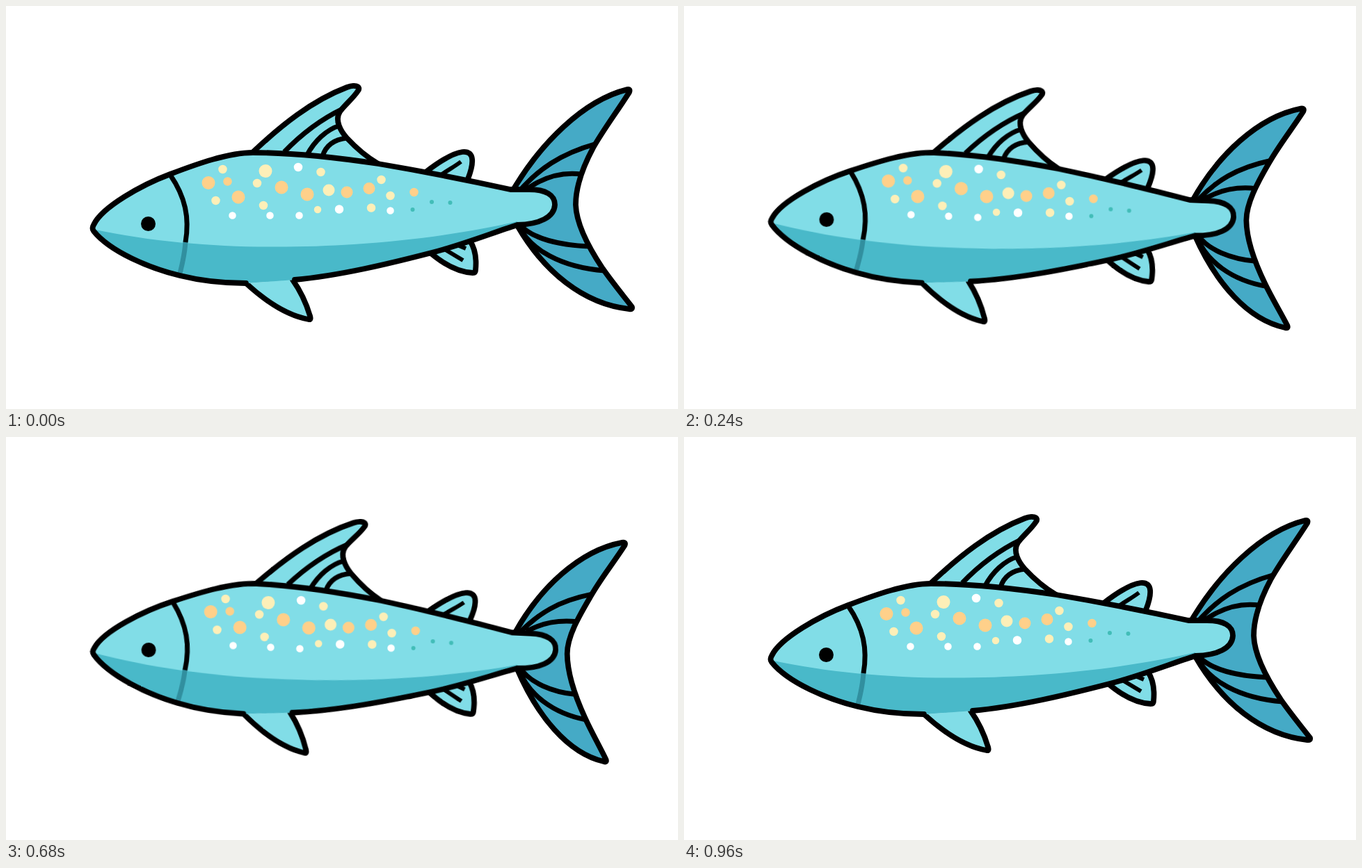
An HTML page without scripts for the animation above (1 s loop, 966x580 px).

```html
<!DOCTYPE html>
<html lang="en">
<head>
<meta charset="utf-8">
<title>Swimming fish</title>
<style>
  html, body { margin: 0; width: 100%; height: 100%; overflow: hidden; background: #fff; }
  svg { display: block; width: 100%; height: 100%; }

  .line { fill: none; stroke: #000; stroke-width: 7.8; stroke-linecap: round; stroke-linejoin: round; }
  .ray { stroke-width: 7; stroke-linecap: butt; }
  .skin { fill: #81dde7; }
  .tail { fill: #45aac6; }
  .dots { fill: none; stroke-linecap: round; }
  .orange { stroke: #ffd08a; }
  .cream { stroke: #fdefb8; }
  .white { stroke: #fff; }
  .teal { stroke: #42bdb8; }

  .fish { transform-origin: 355px 322px; animation: sway 1s infinite; }
  .flex { d: var(--up); animation: flex 1s infinite; }

  .tail {
    --up: path("M730 263 C768 199 829 136 893 120 Q898 119 896 124 C877 154 860 176 844 204 C829 232 819 260 819 286 C820 314 838 348 858 378 C872 398 886 415 900 433 Q901 437 896 436 C830 429 773 382 735 316 Z");
    --down: path("M734 286 C766 227 821 174 883 164 Q889 163 887 168 C868 197 851 217 838 241 C821 269 802 298 802 322 C802 350 812 386 822 413 C830 435 840 455 848 476 Q850 481 845 479 C799 465 760 409 734 339 Z");
  }
  .rays {
    --up: path("M740 264 C765 236 795 213 849 198 M748 264 C770 248 795 238 827 242 M740 316 C758 335 796 344 838 346 M738 318 C754 350 797 376 861 381");
    --down: path("M739 287 C765 262 792 245 840 237 M748 286 C768 276 790 272 819 275 M739 339 C752 361 780 376 812 380 M737 342 C750 377 780 406 824 417");
  }

  /* leaves each upper pose at speed, settles into the lower one */
  @keyframes sway {
    0% { transform: rotate(0deg); animation-timing-function: cubic-bezier(.333, .333, .667, 1); }
    48% { transform: rotate(3.72deg); animation-timing-function: cubic-bezier(.333, 0, .667, .667); }
    96%, 100% { transform: rotate(0deg); }
  }
  @keyframes flex {
    0% { d: var(--up); animation-timing-function: cubic-bezier(.333, .333, .667, 1); }
    48% { d: var(--down); animation-timing-function: cubic-bezier(.333, 0, .667, .667); }
    96%, 100% { d: var(--up); }
  }
</style>
</head>
<body>
<svg viewBox="0 0 966 580">
  <defs>
    <path id="body" d="M345 399 C310 399 278 395 250 388 C208 378 150 354 126 324 Q123 320 126 315 C138 289 196 257 236 242 C275 227 320 211 355 211 C410 211 475 218 535 227 C600 238 670 252 725 264 L752 264 C776 264 789 272 789 286 C788 304 767 314 735 315 C695 328 655 344 612 355 C550 371 480 388 415 394"/>
    <clipPath id="inside"><use href="#body"/></clipPath>
  </defs>

  <path class="line tail flex"/>
  <path class="line ray rays flex"/>

  <g class="fish">
    <g class="line">
      <path class="skin" d="M353 212 C395 172 440 136 490 117 C500 113 511 115 506 122 C499 133 487 142 480 152 C472 164 481 180 490 190 C503 204 518 217 535 227"/>
      <path class="skin" d="M602 240 C620 226 640 212 656 210 C675 208 672 228 664 249"/>
      <path class="skin" d="M611 356 C630 372 650 383 671 384 Q675 384 675 380 C677 360 673 347 667 338"/>
      <path class="skin" d="M345 399 C370 422 401 445 435 451 Q439 452 437 446 C432 429 424 411 412 394"/>
      <path class="ray" d="M400 210 C425 184 455 162 484 148 M433 214 C443 195 460 178 480 172 M455 216 C460 200 472 192 490 190"/>
      <path class="ray" style="stroke-width:6" d="M624 244 C635 236 645 231 654 224 M632 351 L657 366 M649 344 L661 349"/>
    </g>

    <use href="#body" class="skin"/>
    <path clip-path="url(#inside)" fill="#49b9c9" d="M120 320 C250 349 390 350 500 343 C590 337 670 325 735 310 V420 H120 Z"/>
    <path class="line ray" style="stroke:#318f9f" d="M258 339 C257 358 253 372 250 385"/>
    <path class="line ray" d="M236 243 C258 275 264 305 258 340"/>
    <use href="#body" class="line"/>
    <circle cx="204.5" cy="313.5" r="10.5"/>

    <g class="dots">
      <g class="orange">
        <path stroke-width="19" d="M291 254.5h.01M396 261h.01M334 275h.01M433 271h.01"/>
        <path stroke-width="17" d="M490 268h.01M522 262.5h.01"/>
        <path stroke-width="12.5" d="M318.5 252.5h.01M586.5 268h.01"/>
      </g>
      <g class="cream">
        <path stroke-width="19" d="M373 237.5h.01"/>
        <path stroke-width="17" d="M464 265h.01"/>
        <path stroke-width="12.5" d="M311.5 235h.01M361 255h.01M301.5 280h.01M370 287h.01M452.5 239h.01M539.5 250h.01M552.5 273h.01M525 290.5h.01"/>
        <path stroke-width="10.5" d="M448 293h.01"/>
      </g>
      <g class="white">
        <path stroke-width="12.5" d="M420 232h.01M479 292.5h.01"/>
        <path stroke-width="10.5" d="M325.5 301.5h.01M379.5 301.5h.01M421.5 301.5h.01M552.5 294.5h.01"/>
      </g>
      <path class="teal" stroke-width="6" d="M584.5 293h.01M612 282h.01M638.5 283h.01"/>
    </g>
  </g>
</svg>
</body>
</html>
```
